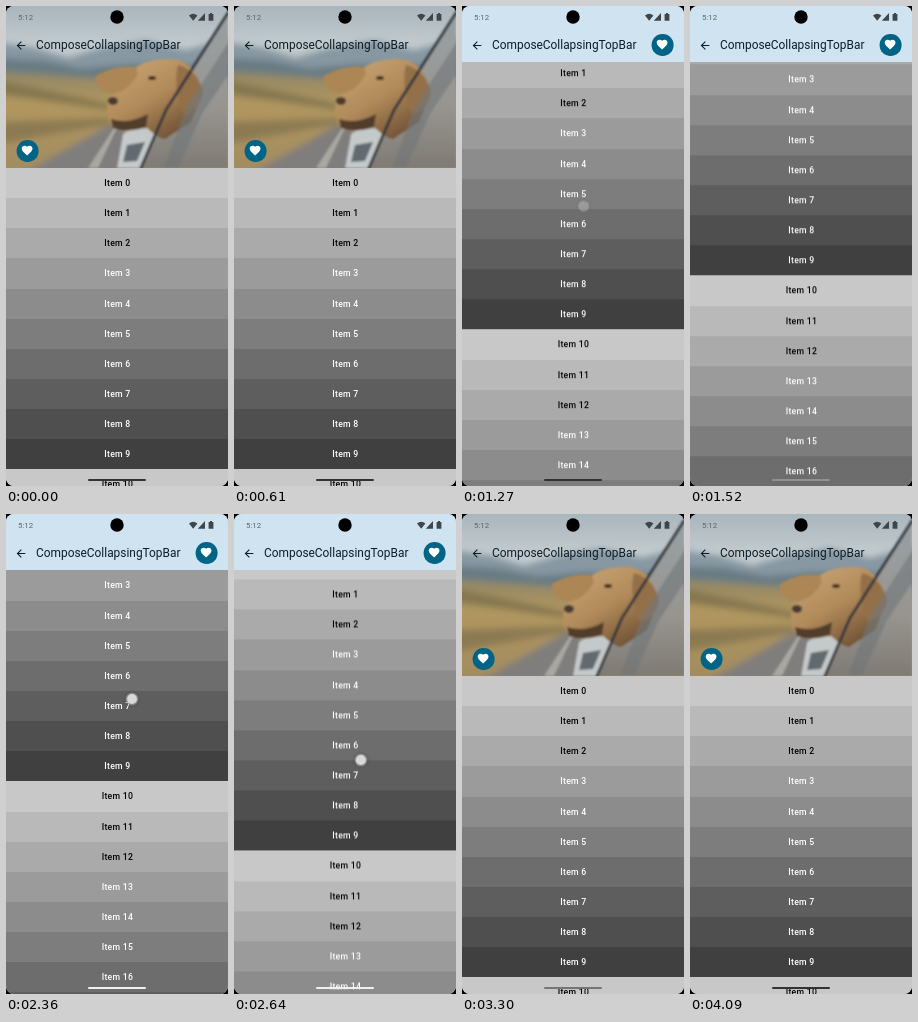
These frames come from a looping animation (222x480 px, 4.12 s). An HTML page:

```html
<!DOCTYPE html>
<html lang="en">
<head>
<meta charset="utf-8">
<title>Collapsing top bar</title>
<style>
html, body { margin: 0; width: 100%; height: 100%; overflow: hidden; background: #000; }
#stage { position: relative; width: 222px; height: 480px; overflow: hidden; border-radius: 8px; background: #cfe3f1; font-family: Roboto, Inter, sans-serif; }
#stage > *, #head > * { position: absolute; left: 0; top: 0; }
#list { width: 222px; will-change: transform; }
.row { height: 30.15px; line-height: 30.5px; text-align: center; text-indent: .8px; font-size: 8.7px; font-weight: 500; letter-spacing: .26px; }
#head { width: 222px; overflow: hidden; }
#tint { width: 222px; height: 56px; background: #cfe3f1; }
#stage > #title { left: 30px; top: 32px; font-size: 11.9px; line-height: 15px; white-space: nowrap; color: #0b1d29; }
#stage > #clock { left: 12px; top: 6px; font-size: 7.8px; line-height: 11px; color: #5c6468; }
#fab { width: 21.5px; height: 21.5px; border-radius: 50%; background: #006487; }
#fab svg { position: absolute; left: 4.25px; top: 4.25px; }
#touch { width: 10px; height: 10px; margin: -5px; border-radius: 50%; background: #d8d8d8; box-shadow: 0 0 0 1.5px #aaa9, 0 0 3px 2px #0003; }
#stage > #pill { left: 82px; top: 472.5px; width: 58px; height: 2px; border-radius: 1px; }
</style>
</head>
<body>
<div id="stage">
  <div id="list"></div>
  <div id="head">
    <svg id="photo" width="222" height="162">
      <defs>
        <linearGradient id="sky" x2="0" y2="1"><stop stop-color="#a9b6bd"/><stop offset=".4" stop-color="#c3cbce"/><stop offset="1" stop-color="#aab5ba"/></linearGradient>
        <linearGradient id="field" x2="0" y2="1"><stop stop-color="#8f8667"/><stop offset=".3" stop-color="#b1965f"/><stop offset="1" stop-color="#a08b5f"/></linearGradient>
        <linearGradient id="fur" x2=".7" y2="1"><stop stop-color="#cda878"/><stop offset=".55" stop-color="#b18a5a"/><stop offset="1" stop-color="#6d4f33"/></linearGradient>
        <linearGradient id="glass" x2="0" y2="1"><stop stop-color="#98a1a5"/><stop offset=".6" stop-color="#989590"/><stop offset="1" stop-color="#7f7a74"/></linearGradient>
        <filter id="soft"><feGaussianBlur stdDeviation="3"/></filter>
        <filter id="mild"><feGaussianBlur stdDeviation=".8"/></filter>
      </defs>
      <rect width="222" height="100" fill="url(#sky)"/>
      <g filter="url(#soft)">
        <path d="M-8 36L30 42 62 52 95 42 140 34 180 44 230 30V95H-8z" fill="#8798a3"/>
        <path d="M-8 52L35 54 75 62 125 58 230 60V95H-8z" fill="#697b83"/>
        <path d="M-8 65L60 70 110 74 230 78V172H-8z" fill="url(#field)"/>
        <path d="M-8 74L105 98V104L-8 88z" fill="#85774f"/>
        <path d="M-8 116L105 112V118L-8 138z" fill="#8c7a52"/>
        <path d="M104 118L122 120 130 172H10z" fill="#807e7c"/>
      </g>
      <g filter="url(#mild)">
        <path d="M108 122L111 122 92 162H82z" fill="#a9a7a1"/>
        <path d="M222 8L160 106 134 162H222z" fill="url(#glass)"/>
        <path d="M117 128Q128 119 150 124L134 162H111z" fill="#c4c9ca"/>
        <path d="M121 139L139 136 131 155 117 156z" fill="#626b70"/>
        <path d="M127 64C136 55 150 53 165 53C182 53 193 67 196 88L185 116 159 133C151 132 145 125 140 121C127 126 110 126 105 118C100 108 100 96 105 90C118 85 121 74 127 64z" fill="url(#fur)"/>
        <path d="M130 61C115 59 102 63 90 70C88 77 94 86 105 87C117 88 126 79 132 68z" fill="#ad8655"/>
        <path d="M172 59C184 62 196 74 197 88C193 101 184 109 177 106C171 91 168 74 172 59z" fill="#94704a"/>
        <path d="M105 113Q122 119 142 108L140 121Q123 127 107 122z" fill="#513c2c"/>
        <ellipse cx="107" cy="95" rx="5" ry="4" fill="#4a3b31"/>
        <ellipse cx="146" cy="72" rx="4" ry="2" fill="#3d2c20"/>
        <path d="M224 34L180 102 158 162H172L196 108 224 66z" fill="#70777a" opacity=".6"/>
        <path d="M224 4L160 104 134 164" fill="none" stroke="#30353a" stroke-width="2.8"/>
      </g>
    </svg>
    <div id="tint"></div>
  </div>
  <svg width="222" height="56">
    <circle cx="111" cy="11" r="6.7"/>
    <g fill="#3f464a">
      <path d="M183 9.5Q187.2 6.2 191.4 9.5L187.2 14.7z"/>
      <path d="M199 7V14.7H191.8z"/>
      <path d="M202.6 8H204V7H206V8H207.4V14.7H202.6z"/>
    </g>
    <path transform="translate(8.5 33) scale(.54)" fill="#0b1d29" d="M20 11H7.83l5.59-5.59L12 4l-8 8 8 8 1.41-1.41L7.83 13H20z"/>
  </svg>
  <div id="clock">5:12</div>
  <div id="title">ComposeCollapsingTopBar</div>
  <div id="fab"><svg width="13" height="13" viewBox="0 0 24 24"><path fill="#fff" d="M12 21.35l-1.45-1.32C5.4 15.36 2 12.28 2 8.5 2 5.42 4.42 3 7.5 3c1.74 0 3.41.81 4.5 2.09C13.09 3.81 14.76 3 16.5 3 19.58 3 22 5.42 22 8.5c0 3.78-3.4 6.86-8.55 11.54z"/></svg></div>
  <div id="pill"></div>
  <div id="touch"></div>
</div>
<script>
const LOOP = 4120, OPEN = 162, CLOSED = 56, TRAVEL = 196;
const $ = id => document.getElementById(id);
const place = (id, x, y) => $(id).style.transform = `translate(${x}px,${y}px)`;
const gray = v => `rgb(${v},${v},${v})`;
const ramp = (t, from, to) => Math.min(1, Math.max(0, (t - from) / (to - from)));
const ease = x => x * x * (3 - 2 * x);
const pulse = (t, from, to) => ramp(t, from, from + 60) * ramp(t, to, to - 60);

for (let i = 0; i < 18; i++) {
  const row = document.createElement('div'), shade = i % 10;
  row.className = 'row';
  row.textContent = 'Item ' + i;
  row.style.background = gray(200 - 15.1 * shade);
  row.style.color = shade < 3 ? '#000' : '#fff';
  $('list').append(row);
}

function draw(now) {
  const t = now % LOOP;

  // One swipe up, then one swipe down.
  const up = TRAVEL * ease(ramp(t, 715, 1575));
  const down = TRAVEL * ease(ramp(t, 2360, 3060));
  const offset = up - down;
  const height = Math.max(CLOSED, OPEN - offset);
  const folded = (OPEN - height) / (OPEN - CLOSED);

  place('list', 0, OPEN - offset);
  $('head').style.height = height + 'px';
  place('photo', 0, (height - OPEN) / 4);
  $('tint').style.opacity = folded ** 1.5;
  place('fab', 10.6 + 179 * folded, height - 28);

  if (t < 2000) place('touch', 117 + up / 30, 340 - up);
  else place('touch', 126 + down / 80, 185 + down * .88);
  $('touch').style.opacity = pulse(t, 640, 1290) + pulse(t, 2220, 2900);

  const light = ramp(t, 1400, 1640) - ramp(t, 2750, 3600);
  $('pill').style.background = gray(50 + 190 * light);
  requestAnimationFrame(draw);
}
draw(performance.now());
</script>
</body>
</html>
```
